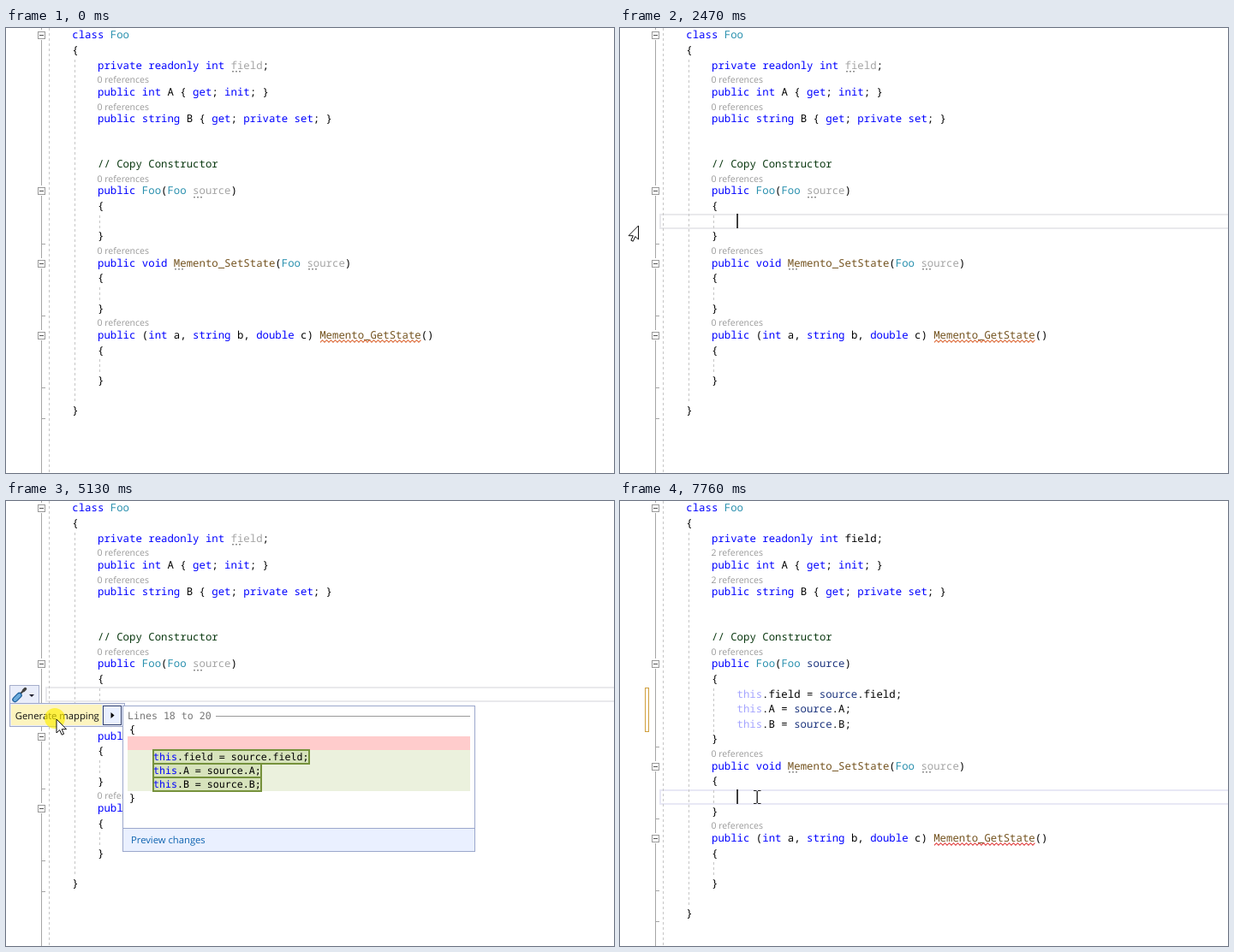
Recreate the animation shown at these times as an HTML page with a canvas. Size 710 px wide and 520 px high, loop 8000 ms.

```html
<!DOCTYPE html>
<html lang="en">
<head>
<meta charset="utf-8">
<title>Generate mapping</title>
<style>
  html, body { margin: 0; width: 100%; height: 100%; overflow: hidden; background: #fff; }
  canvas { display: block; }
</style>
</head>
<body>
<canvas id="stage" width="710" height="520"></canvas>
<script>
const ctx = document.getElementById('stage').getContext('2d');
const LOOP = 8000;
const CODE = '12.35px "Noto Sans Mono", monospace';
const PREVIEW = '11.6px "DejaVu Sans Mono", monospace';
const LENS = '10.5px "Open Sans", sans-serif';
const UI = '11.25px "Open Sans", sans-serif';
const FADED = '#a5a5a5', NAVY = '#1f377f', BLUE = '#0000ff';
const INDENT = [77.3, 107, 136.5];
const KEYWORDS = /^(class|private|readonly|int|public|get|init|string|set|void|double|this)$/;

// Pointer poses: time, x, y, shape, click highlight
const POINTER = [
  [140, 419, 428, 'beam'], [300, 372, 372, 'beam'], [450, 300, 296, 'beam'],
  [600, 232, 238, 'beam'], [750, 186, 214, 'beam'], [910, 167, 219, 'beam'],
  [1060, 164, 224, 'beam', 1], [1220, 164, 224, 'beam'],
  [1860, 205, 207, 'beam'], [2010, 264, 191, 'beam'], [2170, 190, 214, 'beam'],
  [2320, 72, 244, 'beam'], [2470, 21.5, 231, 'left'], [2630, 20.5, 234, 'left'],
  [3100, 22, 231, 'arrow'], [3250, 22, 231, 'arrow', 1], [3410, 22, 231, 'arrow'],
  [3880, 90, 252, 'arrow'], [4030, 240, 300, 'arrow'], [4190, 293, 316, 'arrow'],
  [4340, 150, 278, 'arrow'], [4500, 59, 255, 'arrow'], [5130, 59, 255, 'arrow', 1],
  [5270, 59, 255, 'beam'], [5750, 76, 272, 'beam'], [5900, 112, 304, 'beam'],
  [6060, 143, 331, 'beam'], [6200, 157, 344, 'beam'], [6350, 160, 346, 'beam'],
  [6660, 160, 346, 'beam', 1], [6820, 160, 346, 'beam']
];

const within = (t, from, to) => t >= from && t < to;

function fill(color, x, y, w, h) {
  ctx.fillStyle = color;
  ctx.fillRect(x, y, w, h);
}

function box(x, y, w, h, color, border, width = 1) {
  fill(color, x, y, w, h);
  ctx.strokeStyle = border;
  ctx.lineWidth = width;
  ctx.strokeRect(x + width / 2, y + width / 2, w - width, h - width);
}

function polygon(points, x, y, color, border, flip = 1) {
  ctx.beginPath();
  for (const [px, py] of points) ctx.lineTo(x + px * flip, y + py);
  ctx.closePath();
  ctx.fillStyle = color;
  ctx.fill();
  if (!border) return;
  ctx.strokeStyle = border;
  ctx.lineWidth = 1;
  ctx.stroke();
}

function line(x1, y1, x2, y2, color, width = 1, dash = []) {
  ctx.strokeStyle = color;
  ctx.lineWidth = width;
  ctx.setLineDash(dash);
  ctx.beginPath();
  ctx.moveTo(x1, y1);
  ctx.lineTo(x2, y2);
  ctx.stroke();
  ctx.setLineDash([]);
}

function text(string, x, y, font, color) {
  ctx.font = font;
  ctx.fillStyle = color;
  ctx.fillText(string, x, y);
}

function tokenColor(token) {
  if (KEYWORDS.test(token)) return BLUE;
  if (token === 'Foo') return '#2b91af';
  if (token.startsWith('Memento')) return '#74531f';
  return '#000';
}

function code(string, x, y, colors = {}, font = CODE) {
  for (const token of string.match(/\w+|\W+/g)) {
    text(token, x, y, font, colors[token] || tokenColor(token));
    x += ctx.measureText(token).width;
  }
}

const lens = (y, count = 0) => text(count + ' references', 106.5, y, LENS, '#999');
const guide = (x, y1, y2) => line(x, y1, x, y2, '#c6c6c6', 1, [3, 3]);

function hintDots(x, y) {
  for (let i = 0; i < 3; i++) fill('#8f8f8f', x + i * 4, y, 2, 1.5);
}

function foldBox(y) {
  fill('#fff', 36, y - 6, 11, 12);
  box(37, y - 4, 9, 9, '#fff', '#999');
  line(39, y + .5, 44, y + .5, '#555');
}

function squiggle(x1, x2, y, color) {
  ctx.strokeStyle = color;
  ctx.lineWidth = 1.1;
  ctx.beginPath();
  for (let x = x1, i = 0; x <= x2; x += 2.5, i++) ctx.lineTo(x, y + (i % 2 ? -1.3 : 1.3));
  ctx.stroke();
}

function drawCode(t) {
  const inserted = t >= 5420, analysed = t >= 5750;
  const shift = inserted ? 35 : 0;
  const uses = t >= 6980 ? 2 : 0;

  line(41.5, 0, 41.5, 520, '#a5a5a5');
  guide(50.5, 0, 520);
  guide(80.5, 37, 437 + shift);
  guide(109.5, 219, 235 + shift);
  guide(109.5, 303 + shift, 320 + shift);
  guide(109.5, 387 + shift, 404 + shift);
  for (const y of [252, 336, 420, 456]) line(41, y + shift + .5, 46, y + shift + .5, '#a5a5a5');
  for (const y of [8, 190, 275 + shift, 359 + shift]) foldBox(y);

  code('class Foo', INDENT[0], 12);
  code('{', INDENT[0], 30);
  code('private readonly int field;', INDENT[1], 48, { field: analysed ? '#000' : FADED });
  lens(64, uses);
  code('public int A { get; init; }', INDENT[1], 79);
  lens(96, uses);
  code('public string B { get; private set; }', INDENT[1], 110);
  text('// Copy Constructor', INDENT[1], 163, CODE, '#0a3810');
  lens(180);
  code('public Foo(Foo source)', INDENT[1], 194, { source: analysed ? NAVY : FADED });
  code('{', INDENT[1], 212);
  if (!analysed) {
    hintDots(264, 50);
    hintDots(219, 197);
  }

  if (inserted) {
    const colors = { this: analysed ? '#a5a5ff' : BLUE, source: NAVY };
    ['field', 'A', 'B'].forEach((name, i) =>
      code(`this.${name} = source.${name};`, INDENT[2], Math.round(229.5 + i * 17.5), colors));
    box(29, 218, 5, 52, '#fffaf0', '#d0a040');
  }

  code('}', INDENT[1], 247 + shift);
  lens(264 + shift);
  code('public void Memento_SetState(Foo source)', INDENT[1], 279 + shift, { source: FADED });
  hintDots(197, 281 + shift);
  hintDots(353, 281 + shift);
  code('{', INDENT[1], 296 + shift);
  code('}', INDENT[1], 332 + shift);
  lens(348 + shift);
  code('public (int a, string b, double c) Memento_GetState()', INDENT[1], 363 + shift);
  squiggle(367, 485, 366 + shift, t < 5130 ? '#dc6430' : '#e03838');
  code('{', INDENT[1], 381 + shift);
  code('}', INDENT[1], 416 + shift);
  code('}', INDENT[0], 451 + shift);
}

function drawCurrentLine(t) {
  if (t < 1220) return;
  const y = t < 5420 ? 217 : t < 6820 ? 253 : 337;
  ctx.strokeStyle = t < 5420 ? '#e9e9ec' : '#e8e8f5';
  ctx.lineWidth = 2;
  ctx.strokeRect(47, y + 1, 700, 16);
}

function drawCaret(t) {
  if (within(t, 1220, 1710) || within(t, 2320, 2780)) fill('#000', 136.3, 217, 1.5, 17);
  if (within(t, 5420, 5900) || within(t, 6350, 6820)) fill('#000', 269.8, 253, 1.5, 17);
  if (within(t, 6820, 7290) || t >= 7760) fill('#000', 136.3, 337, 1.5, 17);
}

function drawActionButton() {
  box(4, 215, 35, 22, '#e9edfa', '#a6aecb');
  ctx.lineCap = 'round';
  line(16, 226, 21, 221, '#424242', 2);
  line(20.5, 221.5, 22.5, 219.5, '#424242', 3.5);
  line(10.5, 232, 15.5, 227, '#1c5f9c', 6.5);
  line(10.5, 232, 15.5, 227, '#6cabdc', 4);
  ctx.lineCap = 'butt';
  polygon([[0, 0], [6, 0], [3, 3]], 27, 226, '#1b1b2b');
}

function drawMenu() {
  box(4, 236, 135, 28, '#e9edfa', '#a0a9c9');
  fill('#fdf4bf', 6, 238, 106, 24);
  text('Generate mapping', 10.8, 255, UI, '#111');
  box(113, 239, 22, 23, '#eaf0ff', '#34436f');
  polygon([[0, 0], [4, 3.5], [0, 7]], 122.5, 247, '#000');
}

function drawPreview() {
  box(136, 239, 412, 171, '#fff', '#9ba7cc');
  box(137, 382, 410, 27, '#eaf0ff', '#eaf0ff');
  line(137, 382.5, 547, 382.5, '#9ba7cc');
  text('Lines 18 to 20', 142, 255, PREVIEW, '#777');
  line(245, 251.5, 542, 251.5, '#999');
  fill('#ffcccc', 142, 275, 400, 16);
  fill('#ebf1dd', 142, 291, 400, 48);
  ['field', 'A', 'B'].forEach((name, i) => {
    box(171, 290 + i * 16, i ? 128 : 184, 18, '#d7e3bc', '#76923c', 2);
  });
  ['field', 'A', 'B'].forEach((name, i) => {
    code(`this.${name} = source.${name};`, 172, 303 + i * 16, {}, PREVIEW);
  });
  code('{', 144, 271, {}, PREVIEW);
  code('}', 144, 351, {}, PREVIEW);
  text('Preview changes', 146, 400, UI, '#0e63b0');
}

function drawBeam(x, y) {
  const stroke = (dx, dy, w, h) => fill('#222', x + dx, y + dy, w, h);
  stroke(-.5, -7, 1.4, 14);
  for (const dy of [-8, 7]) {
    stroke(-4, dy, 3.5, 1);
    stroke(1, dy, 3.5, 1);
  }
}

function drawPointer(t) {
  const pose = POINTER.findLast(p => p[0] <= t);
  if (!pose) return;
  const [, x, y, shape, click] = pose;
  if (click) {
    ctx.fillStyle = 'rgba(255, 238, 0, .65)';
    ctx.beginPath();
    ctx.arc(x - 2, y - 1, 12, 0, Math.PI * 2);
    ctx.fill();
  }
  if (shape === 'beam') return drawBeam(x, y);
  const arrow = [[0, 0], [0, 16], [3.7, 12.6], [6.2, 18.2], [8.6, 17.2], [6.2, 11.7], [11.5, 11.7]];
  polygon(arrow, x, y, '#fff', '#111', shape === 'left' ? -1 : 1);
}

function draw(t) {
  fill('#fff', 0, 0, 710, 520);
  drawCurrentLine(t);
  drawCode(t);
  drawCaret(t);
  if (within(t, 2780, 5270)) drawActionButton();
  if (within(t, 3410, 5270)) drawMenu();
  if (within(t, 3560, 5270)) drawPreview();
  drawPointer(t);
}

ctx.textRendering = 'geometricPrecision';
const start = performance.now();
function frame() {
  draw((performance.now() - start) % LOOP);
  requestAnimationFrame(frame);
}
frame();
</script>
</body>
</html>
```
